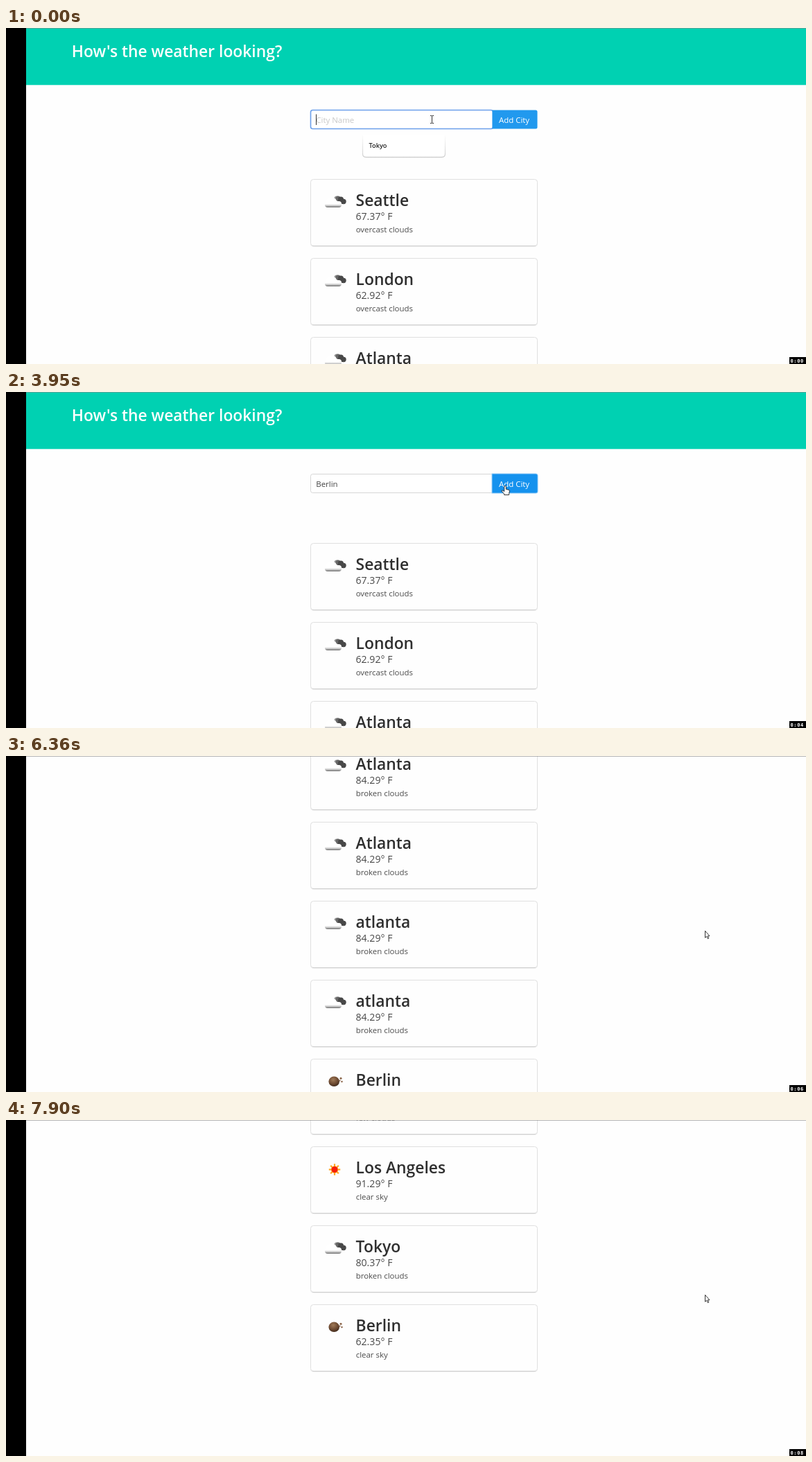
An HTML page for the animation above (8 s loop, 1154x485 px).

```html
<!DOCTYPE html>
<html lang="en">
<head>
<meta charset="utf-8">
<title>Weather</title>
<style>
  html, body { margin: 0; width: 100%; height: 100%; overflow: hidden; background: #fefefe; }
  svg { display: block; width: 1154px; height: 485px; font-family: "Open Sans", "Noto Sans", sans-serif; }
  text { white-space: pre; }
  .title { font-size: 22.85px; font-weight: 600; }
  .city { fill: #2f2f2f; }
  .temp { font-size: 14.1px; fill: #484848; }
  .small { font-size: 11.45px; fill: #4c4c4c; }
  .edge { stroke: #e0e0e0; }
  .hand, .arrow { fill: #fff; stroke: #222; stroke-width: .9; stroke-linejoin: round; }
  .clock { font: bold 7px "DejaVu Sans Mono", monospace; letter-spacing: .65px; fill: #fff; }
</style>
</head>
<body>
<svg viewBox="0 0 1154 485">
  <defs>
    <linearGradient id="puff" x1="0" y1="0" x2="0" y2="1">
      <stop offset=".45" stop-color="#fff"/>
      <stop offset=".7" stop-color="#ccc"/>
      <stop offset="1" stop-color="#6c6c6c"/>
    </linearGradient>
    <radialGradient id="brown" cx=".42" cy=".32" r=".7">
      <stop offset="0" stop-color="#a07a58"/>
      <stop offset=".6" stop-color="#6e4b32"/>
      <stop offset="1" stop-color="#402a1c"/>
    </radialGradient>
    <linearGradient id="fade" gradientUnits="userSpaceOnUse" x1="0" y1="154" x2="0" y2="187">
      <stop offset="0" stop-color="#fefefe"/>
      <stop offset=".6" stop-color="#e4e4e4"/>
      <stop offset="1" stop-color="#cfcfcf"/>
    </linearGradient>
    <g id="cloud">
      <path d="M463 31q2-5 8-5 3 0 4 2" fill="none" stroke="#e2e2e2"/>
      <rect x="460" y="31" width="25" height="10" rx="4" fill="url(#puff)"/>
      <circle cx="470" cy="32" r="5" fill="#fff"/>
    </g>
    <g id="clouds">
      <g fill="#484848">
        <circle cx="477" cy="28" r="3.6" fill="#999"/>
        <circle cx="479" cy="28" r="3.5" fill="#666"/>
        <circle cx="483" cy="29.5" r="4"/>
        <circle cx="487" cy="32.5" r="3.7"/>
        <rect x="477" y="31" width="12" height="5" rx="2.5"/>
      </g>
      <path d="M460 36q1-9 10-9 6 0 7 5 6 0 7 4z" fill="#fff"/>
      <rect x="460" y="32" width="24" height="9" rx="4" fill="url(#puff)"/>
    </g>
    <g id="sun">
      <g id="rays" stroke="#ffa51e" stroke-width="2.2"></g>
      <circle r="5.2" fill="#ffb030"/>
      <circle r="4.5" fill="#f5200c"/>
    </g>
    <g id="few">
      <use href="#cloud" transform="translate(2.5 -1)"/>
      <use href="#sun" transform="translate(484 30.3) scale(.78)"/>
    </g>
    <use id="clear" href="#sun" x="474" y="33.5"/>
    <g id="moon">
      <ellipse cx="473.2" cy="32.8" rx="7.8" ry="7.2" fill="url(#brown)"/>
      <g fill="#8a6448"><circle cx="483" cy="28.3" r="1.5"/><circle cx="484.5" cy="33" r="1.2"/><circle cx="481.7" cy="31.5" r=".9"/></g>
    </g>
  </defs>

  <rect width="1154" height="485" fill="#fefefe"/>
  <g id="top">
    <rect x="29" width="1125" height="82.3" fill="#00d1b2"/>
    <text class="title" x="94.8" y="42" fill="#fff">How's the weather looking?</text>
    <rect id="field" x="439.5" y="118.5" width="263" height="27" rx="3" fill="#fff"/>
    <text id="value" class="small" x="447.3" y="137"></text>
    <path id="caret" d="M0 124.5V140" stroke="#333"/>
    <path id="button" d="M701.5 118.5H764a2.5 2.5 0 0 1 2.5 2.5V143a2.5 2.5 0 0 1-2.5 2.5H701.5z" paint-order="stroke"/>
    <text class="small" x="711" y="137" style="fill:#fff">Add City</text>
    <g id="menu">
      <path d="M514.5 154V181.5q0 5 5 5H628.5q5 0 5-5V154" fill="#fff" stroke="url(#fade)" stroke-width="1.3"/>
      <text id="hint" x="523.5" y="173" font-size="9.2" font-weight="600" fill="#222">Tokyo</text>
    </g>
  </g>
  <g id="list"></g>
  <rect width="29" height="485" fill="#000"/>
  <rect x="29" width="1125" height="1" fill="#888" opacity=".6"/>
  <g id="pointer">
    <path id="beam" d="M-2.5-5.5H-.7L0-5 .7-5.5H2.5M0-5V5M-2.5 5.5H-.7L0 5 .7 5.5H2.5" fill="none" stroke="#333"/>
    <path id="hand" class="hand" d="M-1.3 1.2a1.3 1.3 0 0 1 2.6 0V4.8l4 1q1.2.5 1.1 1.7L5.6 11V13H-1.4V11.6L-4.8 7.8q-.6-1.5 1-1.3L-1.3 8z"/>
    <path id="arrow" class="arrow" d="M.5.5V10.3L2.7 8.3 4.3 11.8 5.8 11.1 4.3 7.8H7z"/>
  </g>
  <rect x="1130" y="475" width="24" height="10" fill="#000"/>
  <text id="clock" class="clock" x="1131.5" y="482.5"></text>
</svg>
<script>
const $ = id => document.getElementById(id);
const LOOP = 8000, FIRST = 218, PITCH = 114.15;

const cities = [
  ["Seattle", "67.37", "overcast clouds", "clouds"],
  ["London", "62.92", "overcast clouds", "clouds"],
  ["Atlanta", "84.29", "broken clouds", "clouds"],
  ["Atlanta", "84.29", "broken clouds", "clouds"],
  ["atlanta", "84.29", "broken clouds", "clouds"],
  ["atlanta", "84.29", "broken clouds", "clouds"],
  ["Berlin", "62.35", "clear sky", "moon"],
  ["Rome", "83.64", "few clouds", "few"],
  ["Chicago", "72.79", "few clouds", "few"],
  ["San Diego", "85.17", "few clouds", "few"],
  ["New York", "72.64", "few clouds", "few"],
  ["Los Angeles", "91.29", "clear sky", "clear"],
  ["Tokyo", "80.37", "broken clouds", "clouds"],
  ["Berlin", "62.35", "clear sky", "moon"]
];

// Each step changes part of the state and holds until the next.
const steps = [
  [0, { value: "", caret: 447.5, focus: "field", hover: false, menu: 1, hint: true,
        pointer: "beam", at: [614.5, 132], scroll: 0, sec: 0 }],
  [250, { value: "B", caret: 454.5, hint: false, pointer: "", menu: .7 }],
  [390, { menu: .35 }],
  [510, { menu: 0 }],
  [810, { value: "Ber", caret: 464.5 }],
  [970, { value: "Berl", caret: 467.5 }],
  [990, { sec: 1 }],
  [1270, { value: "Berli", caret: 470.5 }],
  [1520, { value: "Berlin", caret: 477.5 }],
  [1950, { sec: 2 }],
  [2040, { caret: 0, pointer: "beam", at: [620, 132] }],
  [2120, { at: [668, 134] }],
  [2210, { pointer: "hand", at: [712, 134], hover: true }],
  [2330, { at: [716, 134] }],
  [2490, { caret: 477.5, at: [719, 133] }],
  [2780, { at: [720, 132] }],
  [2930, { caret: 0, focus: "button", at: [720, 135.5] }],
  [2950, { sec: 3 }],
  [3950, { sec: 4 }],
  [4350, { value: "", focus: "", hover: false }],
  [4730, { pointer: "arrow", at: [767, 139] }],
  [4880, { at: [880, 131] }],
  [4950, { sec: 5 }],
  [5020, { at: [1122, 146] }],
  [5290, { at: [1112, 110] }],
  [5410, { at: [1030, 84] }],
  [5530, { at: [951, 78] }],
  [5680, { at: [1111, 170] }],
  [5800, { at: [1008, 252] }],
  [5950, { sec: 6 }],
  [6360, { scroll: 465.5 }],
  [6510, { scroll: 735 }],
  [6640, { scroll: 994.2 }],
  [6790, { scroll: 1260 }],
  [6910, { scroll: 1435.6, sec: 7 }],
  [7900, { sec: 8 }]
];

$("rays").innerHTML = Array.from({ length: 8 }, (_, i) =>
  `<path d="M0-4V-8.2" transform="rotate(${i * 45})"/>`).join("");

$("list").innerHTML = cities.map(([name, temp, sky, icon]) => `<g>
  <rect x="439.5" y="1" width="327" height="96.5" rx="4" fill="none" stroke="#ececec"/>
  <rect class="edge" x="439.5" y=".5" width="327" height="96" rx="4" fill="#fefefe"/>
  <path d="M442 96.5H764" stroke="#d0d0d0"/>
  <use href="#${icon}"/>
  <text class="title city" x="504.6" y="39">${name}</text>
  <text class="temp" x="504.5" y="59">${temp}° F</text>
  <text class="small" x="504.7" y="77">${sky}</text></g>`).join("");
const cards = [...$("list").children];

const set = (id, attrs) => {
  for (const k in attrs) $(id).setAttribute(k, attrs[k]);
};
const show = (id, on) => set(id, { visibility: on ? "visible" : "hidden" });

function draw(t) {
  const s = Object.assign({}, ...steps.filter(([at]) => at <= t).map(([, patch]) => patch));
  const typing = s.focus === "field", pressed = s.focus === "button";

  set("top", { transform: `translate(0 ${-Math.round(s.scroll)})` });
  set("field", { stroke: typing ? "#6b9fea" : "#d6d6d6", "stroke-width": typing ? 1.6 : 1 });
  $("value").textContent = s.value || "City Name";
  $("value").style.fill = s.value ? "#444" : "#c8c8c8";
  show("caret", s.caret);
  set("caret", { transform: `translate(${s.caret} 0)` });
  set("button", { fill: s.hover ? "#1592ee" : "#2199ee", stroke: pressed ? "#8cc8f6" : "none", "stroke-width": 2 });
  set("menu", { opacity: s.menu });
  show("hint", s.hint);

  cards.forEach((card, i) =>
    card.setAttribute("transform", `translate(0 ${Math.round(FIRST + i * PITCH - s.scroll)})`));

  set("pointer", { transform: `translate(${s.at})` });
  for (const id of ["beam", "hand", "arrow"]) show(id, s.pointer === id);
  $("clock").textContent = "0:0" + s.sec;
}

const start = performance.now();
function tick() {
  draw((performance.now() - start) % LOOP);
  requestAnimationFrame(tick);
}
tick();
</script>
</body>
</html>
```
